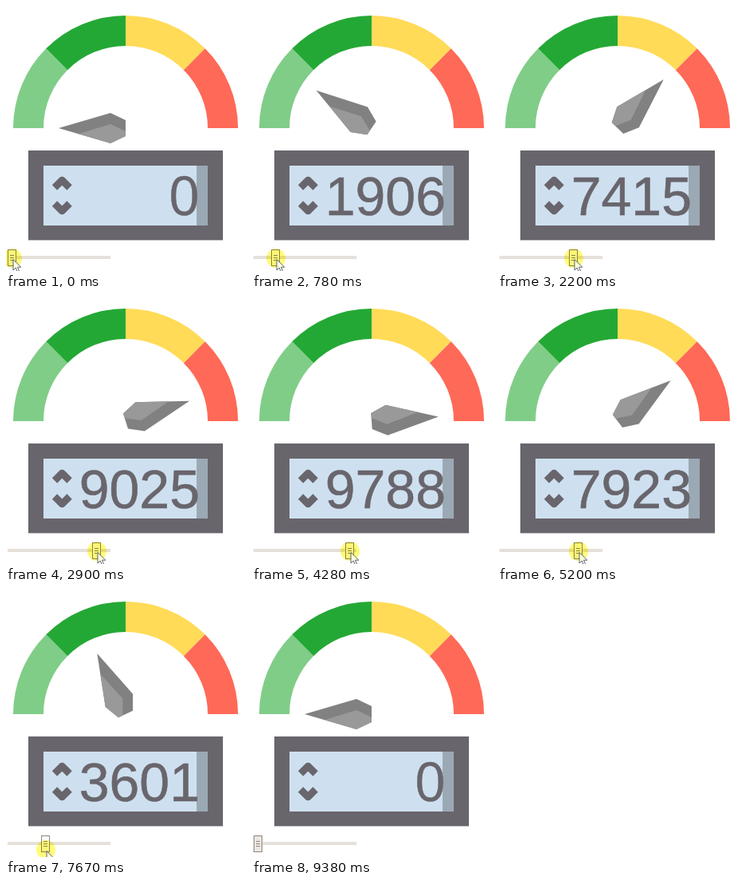
An HTML page that plays this animation: 301 by 332 pixels, repeating every 9.97 s.

```html
<!DOCTYPE html>
<html>
<head>
<meta charset="utf-8">
<title>Gauge with slider</title>
<style>
html, body { margin: 0; width: 100%; height: 100%; overflow: hidden; background: #fff; }
svg { display: block; }
#num { font: 68px "Liberation Sans", Arial, sans-serif; text-anchor: end; fill: #69656c; stroke: #69656c; stroke-width: .6; }
#num.idle { font-family: "Open Sans", "Noto Sans", sans-serif; }
#halo { mix-blend-mode: multiply; }
</style>
</head>
<body>
<svg width="301" height="332" viewBox="0 0 301 332">
  <rect width="301" height="332" fill="#fff"/>
  <g id="dial"></g>
  <g id="needle">
    <path fill="#818181" d="M66 153L131 134L150 143V163L131 172Z"/>
    <path fill="#999" d="M91 160.3L131 148L150 157V163L131 172Z"/>
  </g>
  <rect x="28" y="181" width="244" height="112.4" fill="#69656c"/>
  <rect x="47" y="200" width="206" height="75" fill="#cee0ef"/>
  <rect x="239" y="200" width="14" height="75" fill="#9ba9b4"/>
  <path fill="none" stroke="#69656c" stroke-width="9" stroke-linejoin="round"
    d="M61 227.5L70.3 218.3L79.6 227.5M61 247.5L70.3 256.7L79.6 247.5"/>
  <text id="num" x="243" y="262.3"></text>
  <rect x="2" y="313" width="129" height="4" fill="#e6e0db"/>
  <g id="thumb">
    <rect id="knob" x="2.5" y="305.5" width="10" height="20" stroke="#8d857e"/>
    <path stroke="#8d857e" d="M5 312.5H10M5 315.5H10M5 318.5H10"/>
  </g>
  <g id="pointer">
    <circle id="halo" cy="-1" r="12" fill="#fffb7c"/>
    <path fill="#fffde0" stroke="#46566b" stroke-width=".9" d="M1 .5V14L4.2 11L6.5 16.4L8.7 15.4L6.5 10.2H10.8Z"/>
  </g>
</svg>
<script>
const LOOP = 9970, TICK = 77.4, STEPS = 118, RELEASE = 9380;
const el = id => document.getElementById(id);
const move = (id, x, y) => el(id).setAttribute("transform", `translate(${x} ${y})`);

// Slider drags; power shapes the ease-out
const drags = [
  { start: 320, end: 3820, from: 0, to: 117, power: 1.77 },
  { start: 4200, end: 5970, from: 117, to: 74, power: 1 },
  { start: 6900, end: 7670, from: 73, to: 42, power: 1 },
  { start: 8440, end: RELEASE, from: 42, to: 0, power: 1 }
];

const polar = (r, deg) => {
  const a = deg * Math.PI / 180;
  return `${150 - r * Math.cos(a)} ${153 - r * Math.sin(a)}`;
};
el("dial").innerHTML = ["#80cd88", "#24a835", "#ffdb58", "#ff6957"].map((color, i) => {
  const a = i * 45, b = a + 45;
  return `<path fill="${color}" d="M${polar(141, a)}A141 141 0 0 1 ${polar(141, b)}L${polar(103, b)}A103 103 0 0 0 ${polar(103, a)}Z"/>`;
}).join("");

// Slider step and the time of the latest refresh
function sample(t) {
  const drag = drags.filter(d => t >= d.start).pop();
  if (!drag) return { step: 0, at: 0 };
  const span = drag.end - drag.start;
  const ticks = Math.round(span / TICK);
  const p = Math.min(ticks, Math.floor((t - drag.start) / span * ticks + 0.001)) / ticks;
  const eased = 1 - (1 - p) ** drag.power;
  return {
    step: Math.round(drag.from + (drag.to - drag.from) * eased),
    at: drag.start + span * p
  };
}

function draw(t) {
  const released = t >= RELEASE, idle = t < 100 || released;
  const { step, at } = sample(t);
  const value = idle ? 0 : Math.floor((step + 0.5) * 10000 / STEPS);
  const drift = Math.floor(7 * Math.min(1, at / 7670) ** 6);

  el("needle").setAttribute("transform", `rotate(${value * 0.018} 150 153)`);
  el("num").textContent = value;
  el("num").setAttribute("class", idle ? "idle" : "");
  el("knob").setAttribute("fill", released ? "#ebe7e2" : "#fbfaf6");
  move("thumb", step, 0);
  move("pointer", step + 8, 317 + drift);
  el("pointer").style.display = released ? "none" : "";
}

// Blending must reach the thumb, so the pointer group stays unisolated by using offsets in its children only
const origin = performance.now();
function frame() {
  draw((performance.now() - origin) % LOOP);
  requestAnimationFrame(frame);
}
frame();
</script>
</body>
</html>
```
